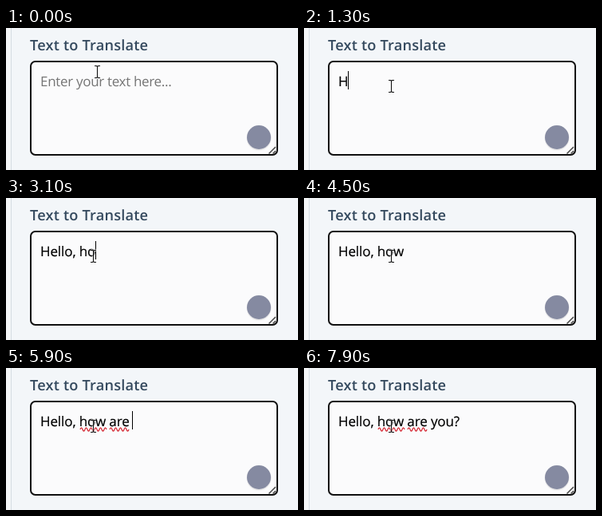
Write an HTML page that moves like this. It is 366 px wide and 178 px high and loops after 8 s.

```html
<!DOCTYPE html>
<html lang="en">
<head>
<meta charset="utf-8">
<title>Text to Translate</title>
<style>
  html, body { margin: 0; width: 100%; height: 100%; overflow: hidden; background: #f3f6f9; }
  svg { display: block; width: 366px; height: 178px; }
  text { font-family: "Open Sans", "Noto Sans", sans-serif; font-size: 17px; white-space: pre; text-rendering: geometricPrecision; }
  .title { font-size: 18.2px; font-weight: 600; letter-spacing: .18px; fill: #34495e; }
  #hint { fill: #757575; letter-spacing: -.31px; }
  #typed { fill: #000; stroke: #000; stroke-width: .2; letter-spacing: -.11px; }
  .wave { fill: none; stroke: #d3202c; stroke-width: 1.2; }
</style>
</head>
<body>
<svg viewBox="0 0 366 178">
  <rect width="6" height="178" fill="#f4f6f8"/>
  <rect x="6" width="1" height="178" fill="#d5dce3"/>
  <text class="title" x="30" y="28">Text to Translate</text>
  <rect x="31" y="42" width="309" height="117" rx="5.75" fill="#fbfbfc" stroke="#101010" stroke-width="2"/>
  <path d="M329.5 157.5l8.5-8.5M334.5 157.5l3.5-3.5" stroke="#444" stroke-width="1.5"/>
  <circle cx="317" cy="138" r="15.5" fill="#000" opacity=".08"/>
  <circle cx="317" cy="137" r="15" fill="#858aa1"/>
  <text id="hint" x="43" y="73">Enter your text here...</text>
  <text id="typed" x="43" y="73"></text>
  <path id="wave1" class="wave"/>
  <path id="wave2" class="wave"/>
  <rect id="caret" y="54" width="1" height="23" fill="#000"/>
  <g id="pointer" fill="none">
    <path d="M-3.5 -7.5h2.5l1 1l1 -1h2.5M0 -6.5v13M-3.5 7.5h2.5l1 -1l1 1h2.5" stroke="#fff" stroke-width="2.4" opacity=".7"/>
    <path d="M-3.5 -7.5h2.5l1 1l1 -1h2.5M0 -6.5v13M-3.5 7.5h2.5l1 -1l1 1h2.5" stroke="#111" stroke-width="1.1"/>
  </g>
</svg>
<script>
const LOOP = 8000, BLINK = 530, LEFT = 43;
const message = "Hello, how are you?";
// One key press time per character of the message
const keys = [1050, 1500, 1700, 1900, 2100, 2300, 2700, 2900, 3100, 3500,
              4700, 4900, 5100, 5300, 5600, 6000, 6200, 6600, 7300];
const get = id => document.getElementById(id);
const [hint, typed, caret, pointer, wave1, wave2] =
  ["hint", "typed", "caret", "pointer", "wave1", "wave2"].map(get);

function wavy(x, end) {
  let d = `M${x} 77`;
  for (let up = true; x < end; up = !up) d += `q1.5 ${up ? -4.2 : 4.2} 3 0`, x += 3;
  return d;
}
wave1.setAttribute("d", wavy(93, 125));
wave2.setAttribute("d", wavy(130, 153));

const show = (el, on) => el.setAttribute("visibility", on ? "visible" : "hidden");

function draw(t) {
  const count = keys.filter(k => k <= t).length;
  const text = message.slice(0, count);
  if (typed.textContent !== text) typed.textContent = text;
  show(hint, !count);
  show(wave1, t >= 4750);
  show(wave2, t >= 5650);

  const lastKey = count ? keys[count - 1] : -600;
  show(caret, Math.floor((t - lastKey) / BLINK) % 2 === 0);
  caret.setAttribute("x", Math.floor(LEFT + (count ? typed.getComputedTextLength() : 0)));

  const p = Math.min(1, Math.max(0, (t - 100) / 500));
  const e = p * p * (3 - 2 * p);
  pointer.setAttribute("transform", `translate(${114.5 - 5 * e} ${55 + 18 * e})`);
}

const start = performance.now();
function tick() {
  draw((performance.now() - start) % LOOP);
  requestAnimationFrame(tick);
}
tick();
</script>
</body>
</html>
```
